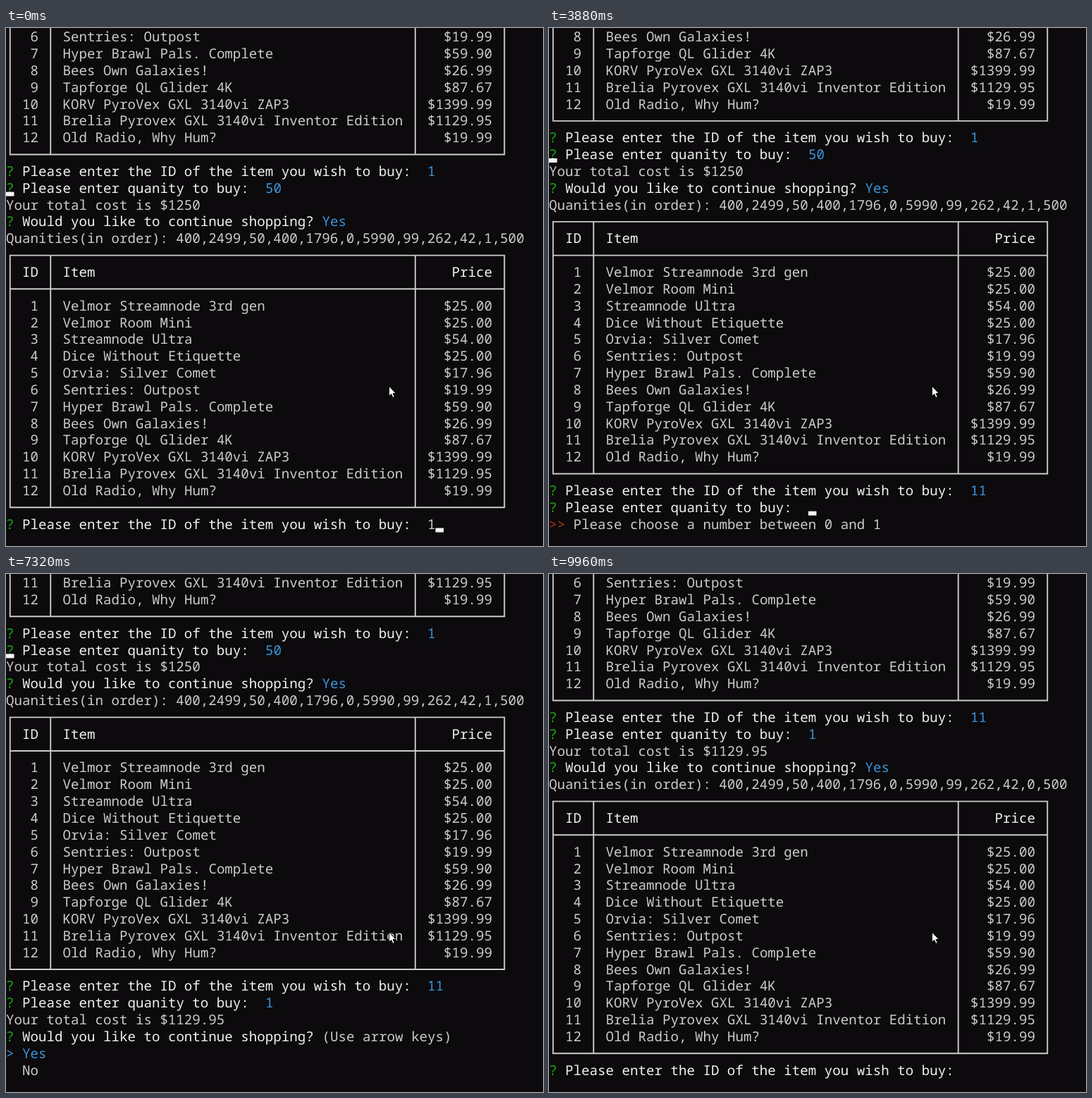
Animation of 762 by 735 pixels, one loop 10 s. Source, as an HTML page:

```html
<!DOCTYPE html>
<html lang="en">
<head>
<meta charset="utf-8">
<title>Terminal shop</title>
<style>
  html, body { margin: 0; width: 100%; height: 100%; overflow: hidden; background: #0c0a0c; }
  svg { display: block; width: 762px; height: 735px; }
  text {
    font: 500 19.167px "Noto Sans Mono", "DejaVu Sans Mono", monospace;
    font-variant-ligatures: none;
    text-rendering: geometricPrecision;
    white-space: pre;
  }
</style>
</head>
<body>
<svg viewBox="0 0 762 735">
  <g id="log"></g>
  <path d="M543.6 508.2V522.2L546.7 519.3L549 524.4L551.3 523.4L549.1 518.5H553.2Z" fill="#fff" stroke="#000" stroke-width=".9"/>
</svg>
<script>
const LOOP = 10000, CELL = 11.5, LINE = 23.845, MID = 12.6;
const GREY = '#cccccc', WHITE = '#f2f2f2', GREEN = '#16ac10', BLUE = '#3a96dd', RED = '#b8361f';

// Moments of the session, in ms
const SECOND_DIGIT = 120, ID_SENT = 840, REDRAW = 2360, REDRAWN = 2400,
      REJECTED = 3400, RETYPED = 5400, QTY_SENT = 7080, CONTINUED = 8680;

const ITEMS = [
  ['Velmor Streamnode 3rd gen', '25.00'],
  ['Velmor Room Mini', '25.00'],
  ['Streamnode Ultra', '54.00'],
  ['Dice Without Etiquette', '25.00'],
  ['Orvia: Silver Comet', '17.96'],
  ['Sentries: Outpost', '19.99'],
  ['Hyper Brawl Pals. Complete', '59.90'],
  ['Bees Own Galaxies!', '26.99'],
  ['Tapforge QL Glider 4K', '87.67'],
  ['KORV PyroVex GXL 3140vi ZAP3', '1399.99'],
  ['Brelia Pyrovex GXL 3140vi Inventor Edition', '1129.95'],
  ['Old Radio, Why Hum?', '19.99']
];
const ASK_ID = 'Please enter the ID of the item you wish to buy:';
const ASK_QTY = 'Please enter quanity to buy:';
const ASK_MORE = 'Would you like to continue shopping?';
const STOCK = 'Quanities(in order): 400,2499,50,400,1796,0,5990,99,262,42,';

const log = document.getElementById('log');
const timed = [];
const midY = row => MID + row * LINE;

function add(tag, attrs, from = 0, to = LOOP) {
  const el = document.createElementNS('http://www.w3.org/2000/svg', tag);
  for (const key in attrs) el.setAttribute(key, attrs[key]);
  log.append(el);
  if (from > 0 || to < LOOP) timed.push({ el, from, to });
  return el;
}

function put(row, col, str, fill, from, to) {
  add('text', { x: col * CELL, y: midY(row) + 6.6, fill }, from, to).textContent = str;
}

function prompt(row, str, from, to) {
  put(row, 0, '?', GREEN, from, to);
  put(row, 2, str, WHITE, from, to);
}

function caret(row, col, from, to) {
  add('rect', { x: col * CELL, y: midY(row) + 5.4, width: CELL, height: 6, fill: '#f4f4f4' }, from, to);
}

function table(top, from) {
  const lineX = col => (col + .5) * CELL;
  const y0 = midY(top), y1 = midY(top + 15);
  const rules = [top, top + 2, top + 15].map(r => `M${lineX(0)} ${midY(r)}H${lineX(61)}`);
  const bars = [0, 5, 50, 61].map(c => `M${lineX(c)} ${y0}V${y1}`);
  add('path', {
    d: rules.concat(bars).join(''), fill: 'none', stroke: GREY,
    'stroke-width': 1.9, 'stroke-linecap': 'square'
  }, from);
  put(top + 1, 2, 'ID', WHITE, from);
  put(top + 1, 7, 'Item', WHITE, from);
  put(top + 1, 55, 'Price', WHITE, from);
  ITEMS.forEach(([name, price], i) => {
    const row = top + 3 + i, id = String(i + 1);
    put(row, 4 - id.length, id, GREY, from);
    put(row, 7, name, GREY, from);
    put(row, 59 - price.length, '$' + price, GREY, from);
  });
}

// Earlier purchase
table(-8);
prompt(8, ASK_ID);
put(8, 52, '1', BLUE);
prompt(9, ASK_QTY);
put(9, 32, '50', BLUE);
caret(9, 0);
put(10, 0, 'Your total cost is $1250', GREY);
prompt(11, ASK_MORE);
put(11, 39, 'Yes', BLUE);
put(12, 0, STOCK + '1,500', GREY);
table(13);

// Item choice
prompt(29, ASK_ID);
put(29, 52, '1', GREY, 0, SECOND_DIGIT);
put(29, 52, '11', GREY, SECOND_DIGIT, ID_SENT);
put(29, 52, '11', BLUE, ID_SENT);

// Quantity, refused once
prompt(30, ASK_QTY, ID_SENT, REDRAW);
prompt(30, ASK_QTY, REDRAWN);
put(30, 32, '2', GREY, REDRAWN, REJECTED);
put(31, 0, '>>', RED, REJECTED, RETYPED);
put(31, 3, 'Please choose a number between 0 and 1', GREY, REJECTED, RETYPED);
put(30, 32, '1', GREY, RETYPED, QTY_SENT);
put(30, 32, '1', BLUE, QTY_SENT);

// Continue menu
put(31, 0, 'Your total cost is $1129.95', GREY, QTY_SENT);
prompt(32, ASK_MORE, QTY_SENT);
put(32, 39, '(Use arrow keys)', GREY, QTY_SENT, CONTINUED);
put(33, 0, '>', BLUE, QTY_SENT, CONTINUED);
put(33, 2, 'Yes', BLUE, QTY_SENT, CONTINUED);
put(34, 2, 'No', GREY, QTY_SENT, CONTINUED);

// Next round
put(32, 39, 'Yes', BLUE, CONTINUED);
put(33, 0, STOCK + '0,500', GREY, CONTINUED);
table(34, CONTINUED);
prompt(50, ASK_ID, CONTINUED);

// Blinking caret: row, column, on, off
[
  [29, 53, 0, SECOND_DIGIT],
  [29, 54, SECOND_DIGIT, 400],
  [30, 32, ID_SENT, 1370],
  [30, 32, 1900, REDRAW],
  [30, 0, REDRAW, REDRAWN],
  [30, 33, REDRAWN, 2930],
  [30, 32, REJECTED, 3930],
  [30, 32, 4460, 4990],
  [30, 33, RETYPED, 5930],
  [30, 33, 6460, 6990],
  [50, 52, CONTINUED, 9440]
].forEach(step => caret(...step));

const SCROLL = [[CONTINUED, 21], [QTY_SENT, 5], [ID_SENT, 2], [0, 0]];

function draw() {
  const t = performance.now() % LOOP;
  const rows = SCROLL.find(([start]) => t >= start)[1];
  log.setAttribute('transform', `translate(0 ${-rows * LINE})`);
  for (const { el, from, to } of timed) {
    el.style.display = t >= from && t < to ? '' : 'none';
  }
  requestAnimationFrame(draw);
}
draw();
</script>
</body>
</html>
```
